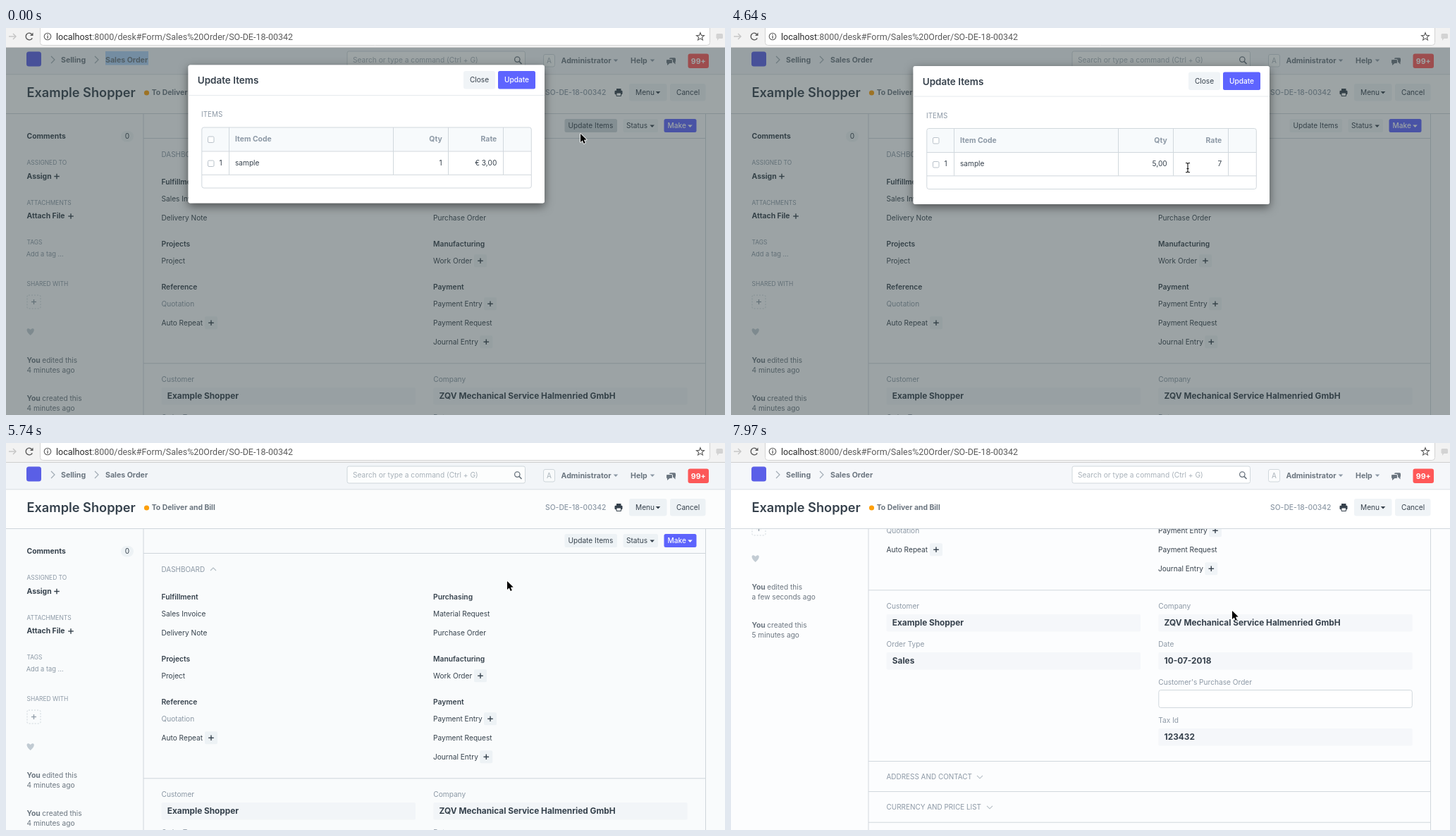
These frames come from a looping animation (1020 px wide and 549 px high, 8 s). An HTML page with a canvas:

```html
<!DOCTYPE html>
<html lang="en">
<head>
<meta charset="utf-8">
<title>Update Items</title>
<style>
html, body { margin: 0; width: 100%; height: 100%; overflow: hidden; background: #fff; }
canvas { display: block; width: 1020px; height: 549px; }
</style>
</head>
<body>
<canvas id="stage"></canvas>
<script>
const W = 1020, H = 549, LOOP = 8000;
const canvas = document.getElementById('stage');
const ratio = window.devicePixelRatio || 1;
canvas.width = W * ratio;
canvas.height = H * ratio;
const c = canvas.getContext('2d');

const INK = '#36414c', MID = '#6c7680', SOFT = '#8d99a6', LINE = '#d1d8dd';
const PANEL = '#f5f7fa', BUTTON = '#f0f4f7', BLUE = '#5e64ff', PICK = '#b0d3f9';
const BASE = 10.14, STRONG = 10.4, NAV = 10.6;
const CUSTOMER = 'Example Shopper';
const COMPANY = 'ZQV Mechanical Service Halmenried GmbH';
const BOX = { x: 258.5, w: 505.5, h: 196 };

// Each step overrides part of the state from its time onward.
const steps = [
  [0, { mouse: [815, 150], pointer: 'arrow', top: 52.5, modal: 1, dim: .48, hover: true, crumb: true,
        qty: '1', rate: '€ 3,00', pick: '', press: 0, freeze: 0, scroll: 0, saved: false }],
  [150, { mouse: [792, 159], top: 54, hover: false }],
  [300, { mouse: [735, 178] }],
  [450, { mouse: [665, 192] }],
  [600, { mouse: [612, 197] }],
  [760, { mouse: [597, 198], pointer: 'beam', crumb: false, qty: '1,00', rate: '3,0000', pick: 'qty' }],
  [910, { mouse: [594, 198] }],
  [2260, { qty: '5', pick: '' }],
  [2410, { mouse: [606, 198] }],
  [2550, { mouse: [630, 198] }],
  [2700, { mouse: [645, 198] }],
  [2850, { mouse: [648, 198], qty: '5,00', pick: 'rate' }],
  [4640, { rate: '7', pick: '' }],
  [4790, { mouse: [664, 180] }],
  [4940, { mouse: [694, 130], pointer: 'arrow' }],
  [5080, { mouse: [716, 88] }],
  [5230, { mouse: [722, 73], pointer: 'hand', press: 1 }],
  [5380, { rate: '7,0000', press: 2 }],
  [5530, { mouse: [720.5, 72], pointer: 'arrow', press: 0, top: 39.5, modal: .78, dim: .34 }],
  [5740, { mouse: [711, 196], modal: 0, dim: .01 }],
  [5910, { mouse: [711, 238], dim: 0 }],
  [6690, { freeze: .25 }],
  [6850, { freeze: .5 }],
  [7020, { scroll: 3.4 }],
  [7230, { freeze: 0, scroll: 120, saved: true }],
  [7380, { scroll: 268 }],
  [7970, { scroll: 267 }]
];

function stateAt(t) {
  const s = {};
  for (const [at, change] of steps) if (at <= t) Object.assign(s, change);
  return s;
}

function text(str, x, y, color = INK, weight = 400, size = BASE, align = 'left') {
  c.font = `${weight} ${size}px Inter, sans-serif`;
  c.fillStyle = color;
  c.textAlign = align;
  c.fillText(str, x, y + size * .36);
}

const strong = (str, x, y, color = INK, size = STRONG, align = 'left') => text(str, x, y, color, 700, size, align);

function rect(x, y, w, h, color) {
  c.fillStyle = color;
  c.fillRect(x, y, w, h);
}

function round(x, y, w, h, r, fill, stroke) {
  c.beginPath();
  c.roundRect(x, y, w, h, r);
  if (fill) { c.fillStyle = fill; c.fill(); }
  if (stroke) { c.strokeStyle = stroke; c.lineWidth = 1; c.stroke(); }
}

function path(points, color, width = 1, fill = '', close = false) {
  c.beginPath();
  for (let i = 0; i < points.length; i += 2) c.lineTo(points[i], points[i + 1]);
  if (close) c.closePath();
  if (fill) { c.fillStyle = fill; c.fill(); }
  if (color) { c.strokeStyle = color; c.lineWidth = width; c.stroke(); }
}

function arc(x, y, r, color, width = 0, from = 0, to = 7) {
  c.beginPath();
  c.arc(x, y, r, from, to);
  if (width) { c.strokeStyle = color; c.lineWidth = width; c.stroke(); }
  else { c.fillStyle = color; c.fill(); }
}

const hline = (x, y, w) => rect(x, y, w, 1, LINE);
const vline = (x, y, h) => rect(x, y, 1, h, LINE);
const caret = (x, y, color) => path([x - 3.3, y - 1.6, x + 3.3, y - 1.6, x, y + 1.9], '', 0, color);

function plus(x, y, color = INK, r = 3.8, w = 1.4) {
  path([x - r, y, x + r, y], color, w);
  path([x, y - r, x, y + r], color, w);
}

function plusButton(x, y) {
  round(x - 9, y - 9, 18, 18, 2, BUTTON);
  plus(x, y);
}

function browserBar() {
  rect(0, 0, W, 28, '#f2f2f2');
  round(48.5, -6, 950, 30.5, 4, '#fff', '#d4d4d4');
  rect(0, 27, W, 1, '#cfcfcf');
  path([4, 12, 14, 12], '#c4c4c4', 1.4);
  path([10, 8, 14, 12, 10, 16], '#c4c4c4', 1.4);
  arc(33, 12, 4.8, '#5a5a5a', 1.5, .5, 5.5);
  path([38.5, 6.5, 38.5, 11, 34, 11], '', 0, '#5a5a5a');
  arc(59, 12, 4.8, '#5a5a5a', 1.1);
  rect(58.4, 11, 1.3, 4, '#5a5a5a');
  rect(58.4, 8.8, 1.3, 1.3, '#5a5a5a');
  c.font = '12.5px Roboto, sans-serif';
  c.textAlign = 'left';
  c.fillStyle = '#2b2b2b';
  c.fillText('localhost', 71, 16.5);
  const w = c.measureText('localhost').width;
  c.fillStyle = '#5c5c5c';
  c.fillText(':8000/desk#Form/Sales%20Order/SO-DE-18-00342', 71 + w, 16.5);
  const star = [];
  for (let i = 0; i < 10; i++) {
    const r = i % 2 ? 2.5 : 5.8, a = i * Math.PI / 5 - Math.PI / 2;
    star.push(985 + r * Math.cos(a), 12.4 + r * Math.sin(a));
  }
  path(star, '#5a5a5a', 1.1, '', true);
  round(1007.5, 8, 9.5, 7, 1.5, '#d3d3d3');
  path([1009, 14, 1012, 14, 1009, 18], '', 0, '#d3d3d3');
}

function navbar(s) {
  rect(0, 28, W, 38, PANEL);
  hline(0, 65.5, W);
  round(29, 33.5, 21, 21, 3.5, '#5b5fe8');
  for (const x of [64, 126]) path([x, 40, x + 5, 45, x, 50], '#a3adb6', 1.2);
  if (s.crumb) rect(141, 33, 61, 19.5, PICK);
  strong('Selling', 78, 45, MID, NAV);
  strong('Sales Order', 141, 45, MID, NAV);
  round(484, 33, 252.5, 24, 2.5, '#fff', LINE);
  text('Search or type a command (Ctrl + G)', 492, 45.3, '#a9b2ba', 400, 10.2);
  arc(725.3, 44.6, 3.7, MID, 1.3);
  path([728, 47.4, 731.5, 51], MID, 1.7);
  round(762.5, 37.5, 16, 17.5, 2.5, '#fbfcfd', LINE);
  text('A', 770.5, 46.3, '#a9b2ba', 400, 10, 'center');
  strong('Administrator', 787.5, 46, MID, NAV);
  caret(865, 46, SOFT);
  strong('Help', 886, 46, MID, NAV);
  caret(917, 46, SOFT);
  round(941, 42.3, 9, 6, 1.5, MID);
  path([946, 48, 949.5, 48, 949.5, 51.5], '', 0, MID);
  round(936.5, 44.5, 9, 6, 1.5, MID, PANEL);
  path([938, 50, 941.5, 50, 938, 53], '', 0, MID);
  round(967.5, 36.5, 29.5, 20.5, 3, '#ff5858');
  strong('99+', 982.3, 46.7, '#fff', NAV, 'center');
}

function header() {
  rect(0, 66.5, W, 55, '#fff');
  hline(0, 121, W);
  text(CUSTOMER, 29.5, 91.4, INK, 600, 18.2);
  arc(199.5, 92, 3.6, '#ffa00a');
  strong('To Deliver and Bill', 206.7, 91.7, MID);
  text('SO-DE-18-00342', 765, 91.5, SOFT, 500, 10.35);
  rect(866, 86, 6.5, 3, INK);
  round(863.5, 88.8, 11, 5.5, 1.2, INK);
  round(866, 92, 6.5, 4.5, 0, '#fff', INK);
  round(884, 79, 53.5, 24.5, 3, BUTTON);
  text('Menu', 893, 91.2);
  caret(925, 91.5, INK);
  round(942, 79, 50.5, 24.5, 3, BUTTON);
  text('Cancel', 951, 91.2);
}

function sidebar(s) {
  const small = (str, y) => text(str, 29.5, y, SOFT, 400, 8.45);
  strong('Comments', 29.5, 153.3);
  round(163, 146, 18, 15.5, 7.7, BUTTON);
  text('0', 172, 153.7, INK, 400, BASE, 'center');
  small('ASSIGNED TO', 191);
  strong('Assign', 29.5, 210);
  plus(72, 210.5);
  small('ATTACHMENTS', 247.7);
  strong('Attach File', 29.5, 266.7);
  plus(92, 267);
  small('TAGS', 304.3);
  text('Add a tag ...', 28.7, 321, SOFT, 400, 9.3);
  small('SHARED WITH', 362.5);
  c.setLineDash([2, 2]);
  round(30, 379, 19, 19, 2, '', LINE);
  c.setLineDash([]);
  plus(39.5, 388.5, SOFT, 3.5, 1.2);
  c.beginPath();
  c.moveTo(34.7, 436);
  c.bezierCurveTo(26, 429, 30, 423.5, 34.7, 428);
  c.bezierCurveTo(39.4, 423.5, 43.4, 429, 34.7, 436);
  c.fillStyle = '#c3ccd4';
  c.fill();
  const log = (verb, when, y) => {
    strong('You', 29.5, y, MID);
    const w = c.measureText('You ').width;
    text(verb + ' this', 29.5 + w, y, MID);
    text(when, 29.5, y + 14.4, MID);
  };
  log('edited', s.saved ? 'a few seconds ago' : '4 minutes ago', 471);
  log('created', s.saved ? '5 minutes ago' : '4 minutes ago', 525);
}

function field(label, value, x, y) {
  text(label, x, y, SOFT);
  if (value) {
    round(x, y + 12, 360.5, 24.5, 2, PANEL);
    strong(value, x + 8.3, y + 24, INK, 11.83);
  } else {
    round(x + .5, y + 11.5, 359.5, 25, 3, '#fff', LINE);
  }
}

function formBody(s) {
  c.save();
  c.beginPath();
  c.rect(0, 122, W, H - 122);
  c.clip();
  rect(0, 122, W, H, '#fcfdfe');
  vline(194.5, 122, H);
  vline(992, 122, H);
  c.translate(0, -s.scroll);
  sidebar(s);

  round(792.5, 129, 74.5, 19, 2.5, s.hover ? '#cfd6dc' : BUTTON);
  text('Update Items', 797.5, 138.5);
  round(875.5, 129, 49.5, 19, 2.5, BUTTON);
  text('Status', 880, 138.5);
  caret(916.7, 139, INK);
  round(933.5, 129, 46, 19, 2.5, BLUE);
  text('Make', 938.5, 138.5, '#fff', 500);
  caret(970.5, 139, '#fff');

  for (const y of [156, 475.3, 718, 761, 804.7]) hline(195, y, 797);
  const section = (str, y, x, dir) => {
    text(str, 220.5, y, SOFT, 400, 9.95);
    path([x - 4, y - 2 * dir, x, y + 2 * dir, x + 4, y - 2 * dir], '#b5bec6', 1.1);
  };
  section('DASHBOARD', 179, 294, -1);

  const heads = [['Fulfillment', 'Purchasing', 218.3], ['Projects', 'Manufacturing', 306.5], ['Reference', 'Payment', 367.2]];
  for (const [a, b, y] of heads) {
    text(a, 220.5, y, INK, 600, 10.3);
    text(b, 606, y, INK, 600, 10.3);
  }
  const links = [
    ['Sales Invoice', 'Material Request', 242.3], ['Delivery Note', 'Purchase Order', 269.2],
    ['Project', 'Work Order', 330], ['Quotation', 'Payment Entry', 391],
    ['Auto Repeat', 'Payment Request', 418], ['', 'Journal Entry', 445]
  ];
  for (const [a, b, y] of links) {
    text(a, 220.5, y, a === 'Quotation' ? SOFT : INK);
    text(b, 606, y);
  }
  plusButton(291, 418.3);
  plusButton(673, 330.3);
  plusButton(687, 391.3);
  plusButton(681.3, 445.3);

  field('Customer', CUSTOMER, 220.5, 498);
  field('Order Type', 'Sales', 220.5, 552);
  field('Company', COMPANY, 606.3, 498);
  field('Date', '10-07-2018', 606.3, 552);
  field("Customer's Purchase Order", '', 606.3, 606);
  field('Tax Id', '123432', 606.3, 660);
  section('ADDRESS AND CONTACT', 740.8, 353, 1);
  section('CURRENCY AND PRICE LIST', 783.8, 367, 1);
  c.restore();
}

// Darkens the page around the dialog, which fades over the bright page itself.
function backdrop(s) {
  c.beginPath();
  c.rect(0, 28, W, H);
  if (s.modal) c.roundRect(BOX.x, s.top, BOX.w, BOX.h, 3);
  c.fillStyle = `rgba(51,65,67,${s.dim})`;
  c.fill('evenodd');
}

function checkbox(x, y) {
  round(x + .5, y + .5, 8.5, 8.5, 1.5, '#fff', '#b9c2ca');
}

function cell(str, right, y, picked) {
  c.font = `400 ${BASE}px Inter, sans-serif`;
  const w = c.measureText(str).width;
  if (picked) rect(right - w, y - 6.5, w, 13, PICK);
  text(str, right, y, INK, 400, BASE, 'right');
}

function dialog(s) {
  if (!s.modal) return;
  c.save();
  c.globalAlpha = s.modal;
  c.translate(0, s.top);
  c.save();
  c.shadowColor = 'rgba(0,0,0,.5)';
  c.shadowBlur = 12.7 * ratio;
  c.shadowOffsetY = 4.2 * ratio;
  round(BOX.x, 0, BOX.w, BOX.h, 3, '#fff');
  c.restore();
  rect(BOX.x, 42.5, BOX.w, 1, '#e6eaed');
  text('Update Items', 271.7, 22, INK, 600, 13.5);
  round(649, 8.5, 45, 25.5, 3, BUTTON);
  text('Close', 671.5, 21, INK, 400, BASE, 'center');
  if (s.press === 2) round(696.3, 7, 56.5, 28.5, 4, '#8cc0fa');
  round(698, 8.5, 53, 25.5, 2.5, [BLUE, '#4349f5', '#2b2fff'][s.press]);
  text('Update', 724.5, 21, '#fff', 500, BASE, 'center');
  text('ITEMS', 277, 70.3, SOFT, 400, 9.9);

  round(278, 88.5, 467, 33.5, [3, 3, 0, 0], '#f7fafc');
  round(277.8, 88.5, 467.5, 86, 3, '', LINE);
  hline(278, 122, 467);
  hline(278, 155.3, 467);
  for (const x of [316, 549, 627, 705]) vline(x, 88.5, 67);
  checkbox(286, 101);
  checkbox(286, 135);
  strong('Item Code', 325, 104.8, SOFT);
  strong('Qty', 618.7, 104.8, SOFT, STRONG, 'right');
  strong('Rate', 696.3, 104.8, SOFT, STRONG, 'right');
  text('1', 302.5, 138.5);
  text('sample', 325, 138.5);
  cell(s.qty, 618.7, 138.5, s.pick === 'qty');
  cell(s.rate, 696.3, 138.5, s.pick === 'rate');
  c.restore();
}

function pointer(s) {
  c.save();
  c.translate(...s.mouse);
  c.lineJoin = 'round';
  if (s.pointer === 'arrow') {
    const shape = [0, 0, 0, 12, 2.8, 9.4, 4.8, 14, 6.8, 13.1, 4.9, 8.7, 8.7, 8.6];
    path(shape, '#fff', 1.6, '', true);
    path(shape, '', 0, '#000', true);
  } else if (s.pointer === 'beam') {
    for (const [color, w] of [['rgba(255,255,255,.8)', 2.6], ['#111', 1.1]]) {
      path([-3, -6.5, -1, -6.5, 0, -5.3, 1, -6.5, 3, -6.5], color, w);
      path([0, -5.3, 0, 5.5], color, w);
      path([-3, 6.7, -1, 6.7, 0, 5.5, 1, 6.7, 3, 6.7], color, w);
      path([-1.5, 1.5, 1.5, 1.5], color, w);
    }
  } else {
    path([-2, 0, 0, 0, .8, 4.5, 2.6, 4, 3.4, 5, 5, 4.7, 5.6, 6, 6.6, 6, 6.6, 9.5, 5, 13.5,
          -1, 13.5, -4.8, 8.2, -4, 7, -1.8, 8.2], '#111', 1.2, '#fff', true);
    for (const x of [.3, 2.3, 4.2]) path([x, 9, x, 11.5], '#111', .8);
  }
  c.restore();
}

function draw(t) {
  const s = stateAt(t);
  c.setTransform(ratio, 0, 0, ratio, 0, 0);
  rect(0, 0, W, H, '#fff');
  browserBar();
  formBody(s);
  navbar(s);
  header();
  if (s.freeze) rect(0, 66.5, W, H, `rgba(252,253,254,${s.freeze})`);
  backdrop(s);
  dialog(s);
  pointer(s);
}

const start = performance.now();
function tick() {
  draw((performance.now() - start) % LOOP);
  requestAnimationFrame(tick);
}
tick();
</script>
</body>
</html>
```
